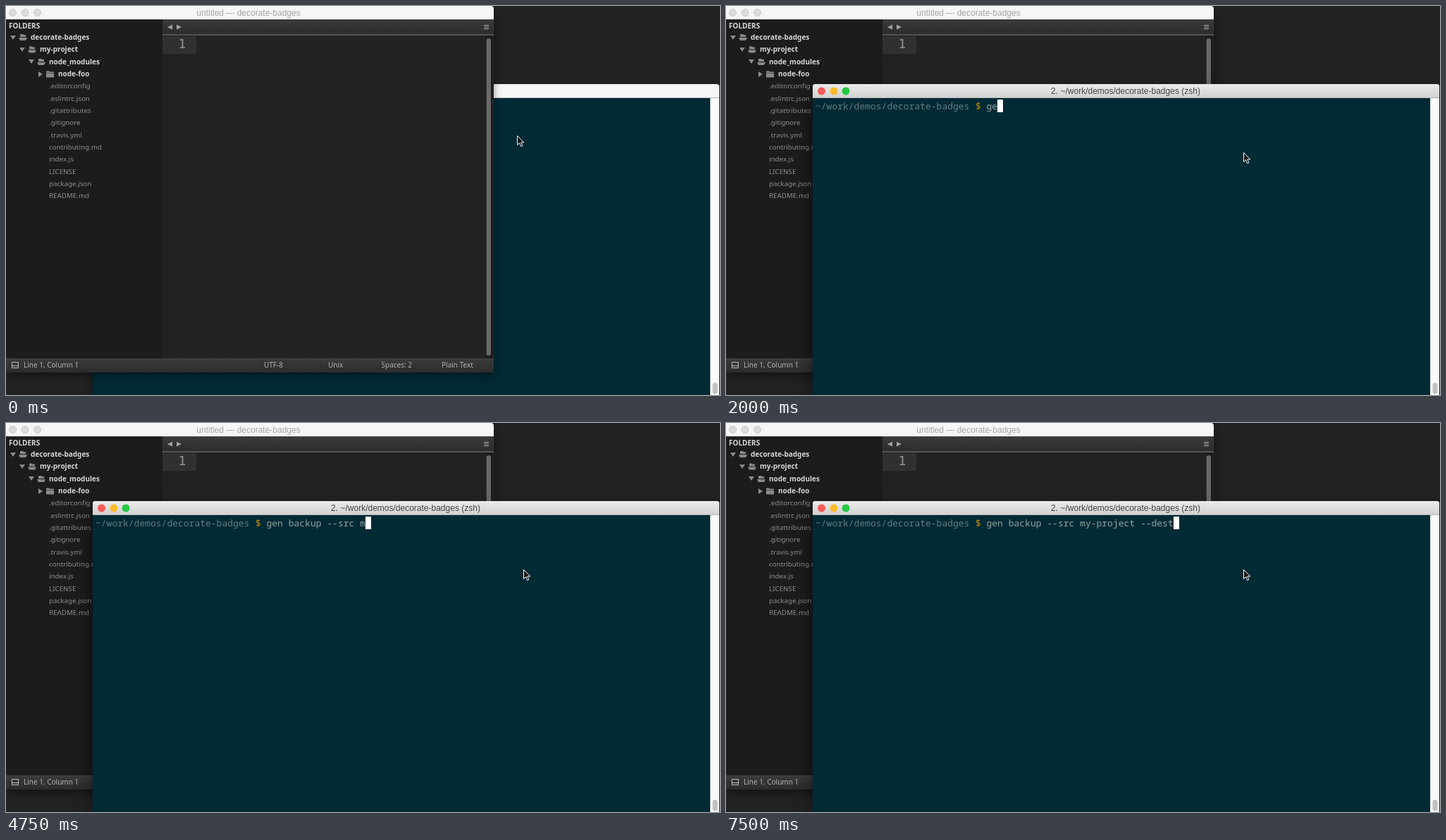
An HTML page for the animation above (8000 ms loop, 1013 by 553 pixels).

```html
<!DOCTYPE html>
<html lang="en">
<head>
<meta charset="utf-8">
<title>Editor and terminal</title>
<style>
  html, body { margin: 0; width: 100%; height: 100%; overflow: hidden; background: #222; }
  svg { display: block; }
  text { white-space: pre; font: 10px "Noto Sans", sans-serif; }
  .title { font: 12px "Liberation Sans", Arial, sans-serif; text-anchor: middle; }
  #tree text { font-size: 9.8px; fill: #8e8e8e; }
  #tree .folder { font-size: 10px; font-weight: bold; fill: #d6d6d6; }
  #status text { fill: #b0b0b0; }
  #shell text { font: 500 13px "Noto Sans Mono", monospace; }
  #editor { filter: drop-shadow(0 5px 6px rgba(0, 0, 0, .4)); }
  #terminal { filter: drop-shadow(0 5px 6px rgba(0, 0, 0, .4)); }
  #terminal.front { filter: drop-shadow(0 12px 13px rgba(0, 0, 0, .55)); }
  #terminal .active { visibility: hidden; }
  #terminal.focused .active { visibility: visible; }
</style>
</head>
<body>
<svg id="stage" width="1013" height="553" viewBox="0 0 1013 553">
  <defs>
    <linearGradient id="activeBar" x2="0" y2="1">
      <stop stop-color="#ebebeb"/><stop offset="1" stop-color="#d1d1d1"/>
    </linearGradient>
    <linearGradient id="darkBar" x2="0" y2="1">
      <stop stop-color="#3b3b3b"/><stop offset="1" stop-color="#2c2c2c"/>
    </linearGradient>
    <path id="openFolder" d="M2 4V0h4l1 1h3v3zM0 5h12l-2 4H2z" fill="#8a8a8a"/>
    <path id="down" d="M0 0h8l-4 6z" fill="#8a8a8a"/>
  </defs>

  <g id="editor">
    <path d="M0 0H688a4 4 0 0 1 4 4V521H0z" fill="#222"/>
    <path d="M0 0H688a4 4 0 0 1 4 4V19H0z" fill="#f6f6f6"/>
    <g fill="#dcdcdc" stroke="#c6c6c6">
      <circle cx="9.5" cy="9.5" r="5"/><circle cx="27" cy="9.5" r="5"/><circle cx="44.5" cy="9.5" r="5"/>
    </g>
    <text class="title" x="344" y="14" fill="#a5a5a5">untitled — decorate-badges</text>

    <path d="M0 19h222v482H0z" fill="#1c1c1c"/>
    <g id="tree">
      <text class="folder" x="4" y="31.5">FOLDERS</text>
      <use href="#down" x="6" y="42"/><use href="#openFolder" x="18" y="40"/>
      <use href="#down" x="19" y="59"/><use href="#openFolder" x="31" y="57.5"/>
      <use href="#down" x="32" y="76"/><use href="#openFolder" x="44" y="75"/>
      <path d="M46 93v8l6-4zM57 92.500h4l1 1h6v1.500H57zM57 95.500h11v6H57z" fill="#8a8a8a"/>
    </g>

    <path d="M222 19h470v22H222z" fill="url(#darkBar)"/>
    <path d="M222 41h470" stroke="#555" stroke-width="2"/>
    <path d="M236 26.500v7l-7-3.500zM242 26.500v7l7-3.500z" fill="#a0a0a0"/>
    <path d="M678 27.500h7m-7 2.500h7m-7 2.500h7" stroke="#b0b0b0" stroke-width="1.200"/>
    <path d="M222 43h48v25h-48z" fill="#303030"/>
    <text x="244.500" y="59.500" fill="#96968c" style="font:18px 'DejaVu Sans Mono',monospace">1</text>
    <path d="M680 42h10v459h-10z" fill="#1b1b1b"/>
    <rect x="681.500" y="46" width="6.500" height="451" rx="3.250" fill="#686868"/>

    <g id="status">
      <path d="M0 501h692v20H0z" fill="url(#darkBar)"/>
      <path d="M0 501.500h692" stroke="#454545"/>
      <path d="M8.500 506.500h9v8h-9zM8.500 511.500h9" fill="none" stroke="#c0c0c0"/>
      <text x="25" y="514">Line 1, Column 1</text>
      <text x="366" y="514">UTF-8</text>
      <text x="457" y="514">Unix</text>
      <text x="532.500" y="514">Spaces: 2</text>
      <text x="618" y="514">Plain Text</text>
    </g>
  </g>

  <g id="terminal">
    <path id="bar" d="M123 553V115a4 4 0 0 1 4-4H1008a4 4 0 0 1 4 4V553z" fill="#f6f6f6"/>
    <path class="active" d="M123 131V115a4 4 0 0 1 4-4H1008a4 4 0 0 1 4 4V131z" fill="url(#activeBar)"/>
    <path d="M123 130.500h889" stroke="#b4b4b4"/>
    <path d="M123 131h876v422H123z" fill="#002a34"/>
    <path d="M999 131h13v422h-13z" fill="#fafafa"/>
    <path d="M999.500 131v422" stroke="#e4e4e4"/>
    <rect x="1002.500" y="535.500" width="7" height="16" rx="3.500" fill="#c1c1c1"/>
    <circle cx="135.500" cy="121" r="5.500" fill="#fc5b57"/>
    <circle cx="153" cy="121" r="5.500" fill="#fdbb2d"/>
    <circle cx="170" cy="121" r="5.500" fill="#28c840"/>
    <text class="title" x="567" y="125" fill="#444">2. ~/work/demos/decorate-badges (zsh)</text>
    <g id="shell">
      <text x="127" y="147" fill="#667c83">~/work/demos/decorate-badges</text>
      <text x="354" y="147" fill="#c4920c">$</text>
      <text id="command" x="369.500" y="147" fill="#96a5a5"></text>
      <rect id="caret" y="133" width="8" height="18" fill="#fff"/>
    </g>
  </g>

  <path id="pointer" d="M.5.5v13l3-2.800 2.200 5 2.200-1-2.200-4.700h4z" fill="#111" stroke="#fff" stroke-linejoin="round"/>
</svg>
<script>
const LOOP = 8000, TICK = 250, CHAR_WIDTH = 7.8;
const COMMAND = "gen backup --src my-project --dest";

// Bursts of typing: start time, then characters shown after each tick.
const BURSTS = [
  [2000, 2, 5, 7, 8, 9],
  [3250, 10, 11, 13, 14, 15],
  [4500, 17, 18, 19, 20, 21],
  [5750, 24, 26],
  [6500, 28, 29, 31, 33, 34],
];

const byId = id => document.getElementById(id);
const [stage, editor, terminal, command, caret, pointer] =
  ["stage", "editor", "terminal", "command", "caret", "pointer"].map(byId);

function addTreeRow(name, row) {
  const label = document.createElementNS(stage.namespaceURI, "text");
  label.setAttribute("x", row < 4 ? 35 + row * 13 : 61);
  label.setAttribute("y", 48 + row * 17.33);
  if (row < 4) label.setAttribute("class", "folder");
  label.textContent = name;
  byId("tree").append(label);
}

["decorate-badges", "my-project", "node_modules", "node-foo",
 ".editorconfig", ".eslintrc.json", ".gitattributes", ".gitignore", ".travis.yml",
 "contributing.md", "index.js", "LICENSE", "package.json", "README.md"].forEach(addTreeRow);

function typedCount(time) {
  let count = 0;
  for (const [start, ...counts] of BURSTS) {
    if (time < start) break;
    count = counts[Math.min(Math.floor((time - start) / TICK), counts.length - 1)];
  }
  return count;
}

function render(time) {
  const inFront = time >= 750;
  const next = inFront ? pointer : editor;
  if (terminal.nextElementSibling !== next) stage.insertBefore(terminal, next);
  terminal.classList.toggle("focused", time >= 500);
  terminal.classList.toggle("front", inFront);

  const count = typedCount(time);
  command.textContent = COMMAND.slice(0, count);
  caret.setAttribute("x", Math.round(369.8 + count * CHAR_WIDTH));
  pointer.setAttribute("transform", time < 250 ? "translate(725 184)" : "translate(734 208)");
}

const origin = performance.now();
function frame() {
  render((performance.now() - origin) % LOOP);
  requestAnimationFrame(frame);
}
frame();
</script>
</body>
</html>
```
